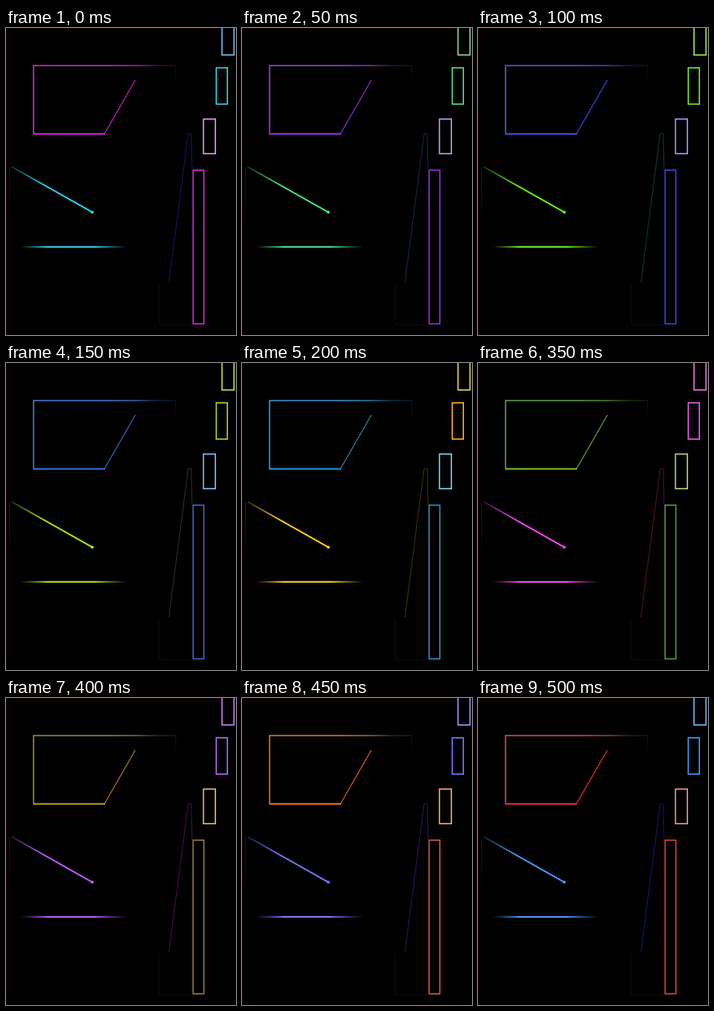
An HTML page for the animation above (550 ms loop, 288 px wide and 384 px high).

```html
<!DOCTYPE html>
<html lang="en">
<head>
<meta charset="utf-8">
<title>Neon outlines</title>
<style>
  html, body { margin: 0; width: 100%; height: 100%; overflow: hidden; background: #000; }
  svg { display: block; width: 288px; height: 384px; }

  /* Each group supplies its own colours; steps(2) adds one in-between colour. */
  .neon { fill: none; stroke: currentColor; stroke-width: 1.6; animation: cycle 550ms infinite; }
  @keyframes cycle {
    0%     { color: var(--a); animation-timing-function: steps(2, end); }
    18.18% { color: var(--b); animation-timing-function: steps(2, end); }
    36.36% { color: var(--c); animation-timing-function: steps(1, end); }
    45.45% { color: var(--d); animation-timing-function: steps(2, end); }
    63.63% { color: var(--e); animation-timing-function: steps(2, end); }
    81.81% { color: var(--f); animation-timing-function: steps(1, end); }
    90.9%  { color: var(--g); animation-timing-function: steps(1, end); }
    100%   { color: var(--a); }
  }

  .edge  { --a: #d232d2; --b: #5a5ad8; --c: #3c9bcd; --d: #329b6e; --e: #64a046; --f: #d27841; --g: #d74b5a; }
  .base  { --a: #e41ee4; --b: #5546f0; --c: #14a0dc; --d: #1ebe3c; --e: #82be1e; --f: #f0781e; --g: #f02d50; }
  .slant { --a: #b41eb4; --b: #4637d2; --c: #1e828c; --d: #1e8c37; --e: #6e8c1e; --f: #c8501e; --g: #c82d41; }
  .bar   { --a: #d228d2; --b: #5037dc; --c: #328cb4; --d: #289641; --e: #5a963c; --f: #d25a32; --g: #dc374b; }
  .beam  { --a: #28d2f0; --b: #64f014; --c: #ffcd14; --d: #ff9632; --e: #f546f0; --f: #826eff; --g: #4696ff; }
  .top   { --a: #78bef5; --b: #aaeb50; --c: #ebd750; --d: #f5af5a; --e: #f078e1; --f: #aa91fa; --g: #78b9fa; }
  .mid   { --a: #32d2e6; --b: #78e623; --c: #faaf28; --d: #fa7d46; --e: #e65ae6; --f: #826eff; --g: #4196f5; }
  .low   { --a: #dc96eb; --b: #a096f0; --c: #78d2e1; --d: #78dca0; --e: #bec878; --f: #f5a578; --g: #eb8cb9; }
  .dim   { --a: #141464; --b: #0f3728; --c: #2d370a; --d: #462d0c; --e: #550c28; --f: #320f5f; --g: #19146e; }
</style>
</head>
<body>
<svg viewBox="0 0 288 384">
  <defs>
    <linearGradient id="fadeTop" gradientUnits="userSpaceOnUse" x1="35" y1="0" x2="214" y2="0">
      <stop offset=".5" stop-opacity="0"/>
      <stop offset=".72" stop-opacity=".25"/>
      <stop offset=".85" stop-opacity=".7"/>
      <stop offset="1" stop-opacity=".85"/>
    </linearGradient>
    <linearGradient id="fadeSide" gradientUnits="userSpaceOnUse" x1="0" y1="47" x2="0" y2="72">
      <stop offset="0" stop-opacity=".82"/>
      <stop offset="1"/>
    </linearGradient>
    <linearGradient id="fadeBeam" gradientUnits="userSpaceOnUse" x1="6" y1="173" x2="50" y2="198">
      <stop offset="0" stop-opacity=".8"/>
      <stop offset="1" stop-opacity="0"/>
    </linearGradient>
    <linearGradient id="fadeEnds" gradientUnits="userSpaceOnUse" x1="18" y1="0" x2="152" y2="0">
      <stop offset="0"/>
      <stop offset=".25" stop-opacity="0"/>
      <stop offset=".7" stop-opacity="0"/>
      <stop offset="1"/>
    </linearGradient>
    <linearGradient id="fadeLeft" gradientUnits="userSpaceOnUse" x1="0" y1="173" x2="0" y2="240">
      <stop offset="0" stop-opacity=".2"/>
      <stop offset="1" stop-opacity=".9"/>
    </linearGradient>
  </defs>

  <rect width="288" height="384"/>
  <path d="M.5 384V.5H270" fill="none" stroke="#14000a"/>
  <path d="M192 320V371H234" fill="none" stroke="#120a1c"/>

  <g class="neon dim">
    <path d="M204 318L228 133Q230 131 232 133L233 178" stroke-width="1.1"/>
    <path d="M4.5 173V240" stroke-width="1"/>
  </g>
  <path d="M4.5 172V241" stroke="url(#fadeLeft)" stroke-width="3"/>

  <g class="neon edge">
    <path d="M34.5 132.5V47H213"/>
    <path d="M212.5 47V71" stroke-width="1"/>
  </g>
  <path d="M35 47H214" stroke="url(#fadeTop)" stroke-width="4"/>
  <path d="M212.5 48V72" stroke="url(#fadeSide)" stroke-width="3"/>
  <path class="neon slant" d="M123.5 132L162 65" style="stroke-width:1.4"/>
  <path class="neon base" d="M34 132.5H124" style="stroke-width:2"/>

  <g class="neon beam">
    <path d="M7 173.5L108 230.3" stroke-width="2"/>
    <circle cx="108" cy="230.3" r="1.9" fill="currentColor" stroke="none"/>
    <path d="M18 273.7H152" stroke-width="2"/>
  </g>
  <path d="M5 172.4L50 197.7" stroke="url(#fadeBeam)" stroke-width="4"/>
  <path d="M50 273.7H112" stroke="#fff" stroke-opacity=".2"/>
  <path d="M17 273.7H153" stroke="url(#fadeEnds)" stroke-width="4"/>

  <rect class="neon top" x="270.5" y="-4" width="15" height="37.7"/>
  <rect class="neon mid" x="263.3" y="49.8" width="13.9" height="45.4"/>
  <rect class="neon low" x="247.3" y="113.9" width="14.9" height="43.3"/>
  <rect class="neon bar" x="234.3" y="177.8" width="13.4" height="192.2"/>
</svg>
</body>
</html>
```
